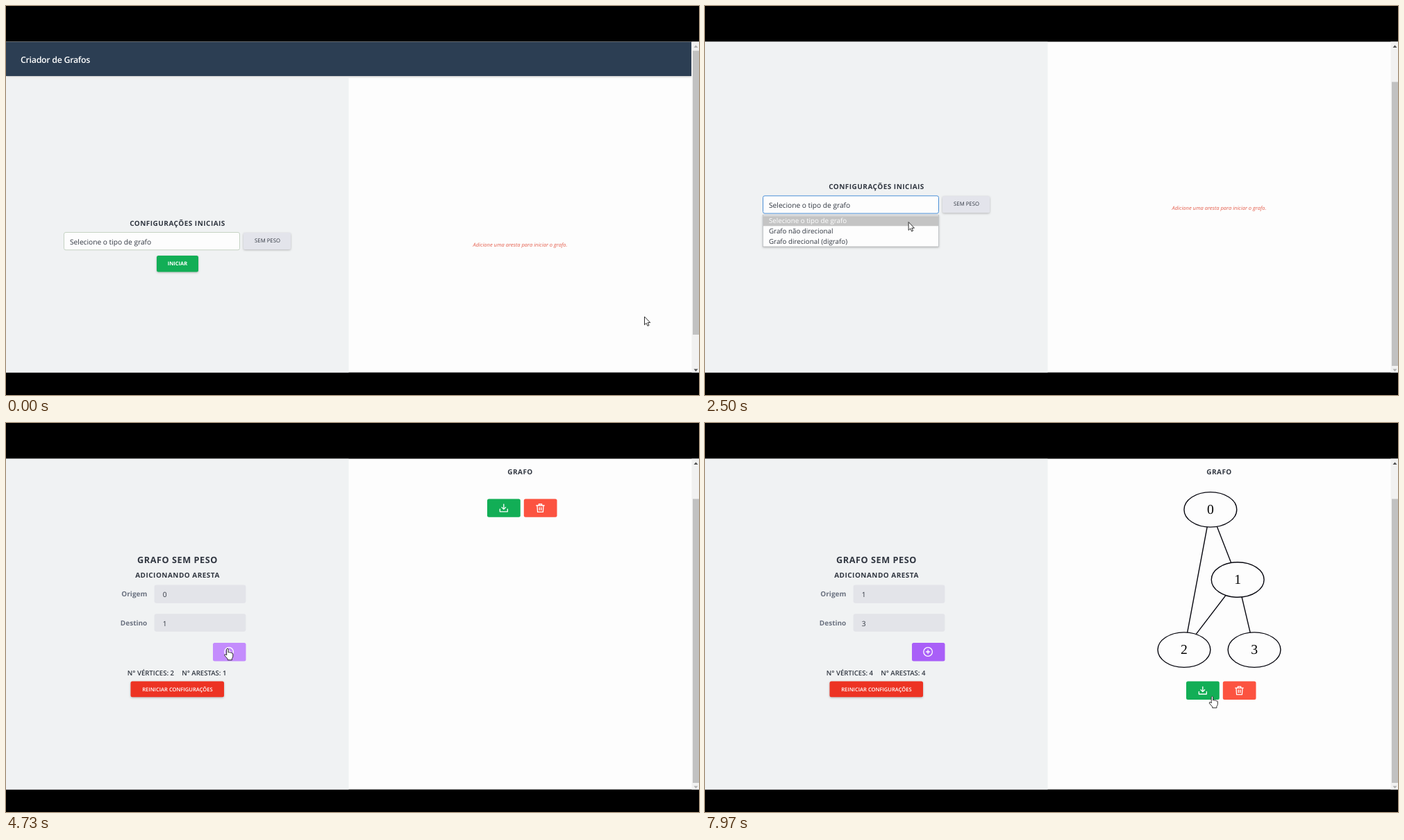
Write an HTML page that moves like this. It is 998 px wide and 561 px high and loops after 8000 ms.

```html
<!DOCTYPE html>
<html lang="pt">
<head>
<meta charset="utf-8">
<title>Criador de Grafos</title>
<style>
  html, body { margin: 0; width: 100%; height: 100%; overflow: hidden; background: #000; }
  svg { display: block; width: 998px; height: 561px; }
  text { font-family: "Open Sans", "Noto Sans", sans-serif; fill: #303640; text-rendering: geometricPrecision; }
  .mid { text-anchor: middle; }
  .bold { font-weight: 700; }
  .semi { font-weight: 600; }
  .caps { font-size: 10px; font-weight: 700; letter-spacing: .48px; text-anchor: middle; }
  .field { font-size: 10.2px; }
  .option { font-size: 9.75px; }
  .label { font-size: 10px; font-weight: 700; fill: #6b7280; text-anchor: end; }
  .count { font-size: 9.6px; font-weight: 600; }
  .on-dark { fill: #fff; }
  .icon { fill: none; stroke: #fff; stroke-width: 1.3; stroke-linecap: round; stroke-linejoin: round; }
  .shadow { filter: drop-shadow(0 1.5px 1.5px rgba(0, 0, 0, .25)); }
  #graph text { font-family: "Liberation Serif", "Noto Serif", serif; fill: #000; text-anchor: middle; }
  #graph line, #graph ellipse { stroke: #080810; fill: #fdfdfd; }
  #cursor path { fill: #fff; stroke: #222; stroke-width: .95; stroke-linejoin: round; }
</style>
</head>
<body>
<svg viewBox="0 0 998 561">
  <clipPath id="window"><rect y="51.5" width="998" height="477"/></clipPath>
  <rect width="998" height="561"/>
  <g clip-path="url(#window)">
    <rect y="51" width="998" height="479" fill="#fdfdfd"/>
    <g id="page">
      <rect y="104" width="493.5" height="600" fill="#f0f2f3"/>
      <rect y="51.5" width="987" height="49.5" fill="#2c3e53" class="shadow"/>
      <text x="21" y="81.5" class="semi on-dark" font-size="12.4" letter-spacing="-.3">Criador de Grafos</text>
      <text id="hint" x="740.5" y="346.8" class="mid" font-size="7.55" font-style="italic" style="fill:#e5604f">Adicione uma aresta para iniciar o grafo.</text>
      <g id="setup">
        <text x="247" y="317" class="caps">CONFIGURAÇÕES INICIAIS</text>
        <rect id="select" x="83.5" y="326.5" width="253" height="25.3" rx="2.5" fill="#fdfdfd" stroke="#c6d3c4"/>
        <text id="choice" x="92" y="343.6" class="field"></text>
        <g class="shadow"><rect x="342" y="327" width="68" height="24" rx="2" fill="#e3e4eb"/></g>
        <text x="376.5" y="341.2" class="mid" font-size="7.75">SEM PESO</text>
        <g class="shadow"><rect x="217" y="360" width="60" height="23.5" rx="2.5" fill="#12ae56"/></g>
        <text x="247" y="374.4" class="mid bold on-dark" font-size="7.5">INICIAR</text>
      </g>
    </g>
    <g id="menu">
      <rect x="83.5" y="301.5" width="253" height="45.5" fill="#fdfdfd" stroke="#b4b7bb" stroke-width=".7" class="shadow"/>
      <rect id="highlight" x="84" width="252" height="14.7" fill="#c4c4c4"/>
      <text x="92" y="313.4" class="option">Selecione o tipo de grafo</text>
      <text x="92" y="328" class="option">Grafo não direcional</text>
      <text x="92" y="342.6" class="option">Grafo direcional (digrafo)</text>
    </g>
    <g id="editor">
      <text x="247" y="202.2" class="mid bold" font-size="12.7" letter-spacing=".55">GRAFO SEM PESO</text>
      <text x="247" y="223.4" class="caps">ADICIONANDO ARESTA</text>
      <text x="203.3" y="250" class="label">Origem</text>
      <text x="203.3" y="292.4" class="label">Destino</text>
      <rect id="originBox" x="214.2" y="234.2" width="130.6" height="25" rx="2.4" stroke-width="1.3"/>
      <rect id="targetBox" x="214.2" y="276" width="130.6" height="24.2" rx="2.4" stroke-width="1.3"/>
      <text id="origin" x="225.8" y="250.8" class="field"></text>
      <text id="target" x="225.8" y="293" class="field"></text>
      <rect id="add" x="298" y="317" width="47.5" height="26.5" rx="2.5"/>
      <path class="icon" d="M314.8 330a6.3 6.3 0 1 0 12.6 0a6.3 6.3 0 1 0-12.6 0M318.6 330h5M321.1 327.5v5"/>
      <text id="vertices" x="174.8" y="363.6" class="count"></text>
      <text id="edges" x="253.2" y="363.6" class="count"></text>
      <g class="shadow"><rect x="179.5" y="372.5" width="134.5" height="22.8" rx="2.5" fill="#ed3323"/></g>
      <text x="247" y="386.9" class="mid semi on-dark" font-size="7.6">REINICIAR CONFIGURAÇÕES</text>
    </g>
    <g id="result">
      <text x="740.5" y="73.6" class="caps">GRAFO</text>
      <g id="graph"></g>
      <g id="tools">
        <rect x="693" y="-13.2" width="47.8" height="26.4" rx="2.5" fill="#12ae56"/>
        <rect x="745.8" y="-13.2" width="47.7" height="26.4" rx="2.5" fill="#fc5340"/>
        <path class="icon" d="M716.8-5.5v7M714 -1l2.8 2.8L719.6-1M711.3 1.5v3.7h11v-3.7"/>
        <path class="icon" d="M763.8-3.6h11.4M767.3-3.6v-2h4.4v2M765-3.6l.6 9.4h7.8l.6-9.4M768.2-.8v3.8M770.8-.8v3.8"/>
      </g>
    </g>
    <rect x="987.5" y="51" width="11" height="479" fill="#f1f1f1"/>
    <rect id="thumb" x="989" width="9" height="409.5"/>
    <path id="upArrow" d="M990.5 60l3-3.4l3 3.4z"/>
    <path id="downArrow" d="M990.5 523.5l3 3.4l3-3.4z"/>
    <g id="cursor">
      <path id="arrow" d="M0 0V11.8L2.7 9.3L4.5 13.4L6.5 12.5L4.7 8.6H8.3Z"/>
      <path id="hand" d="M-1.3 1.2Q0-.8 1.2 1.2V6Q2.4 4.8 3.5 6.2Q4.9 5.2 5.8 6.8Q7.4 6.2 7.8 8V11.5Q7.6 13.5 6.4 14.6V16.8H.2V15.2L-4.2 10.2Q-4.4 8.2-2.6 8.7L-1.3 10Z"/>
      <path id="beam" d="M-2-5.5H2M0-5.5V5.5M-2 5.5H2"/>
    </g>
  </g>
</svg>
<script>
const LOOP = 8000, SCROLL = 52.7;
const el = Object.fromEntries([...document.querySelectorAll('[id]')].map(e => [e.id, e]));
const set = (e, attrs) => { for (const k in attrs) e.setAttribute(k, attrs[k]); };
const show = (e, on) => { e.style.display = on ? '' : 'none'; };
const ease = p => p * p * (3 - 2 * p);
const clamp = p => Math.min(1, Math.max(0, p));

// time, x, y of the pointer tip
const path = [
  [0, 919.5, 448], [150, 920, 447], [650, 985, 330], [820, 1001, 260], [1720, 1001, 310],
  [2200, 290, 290], [2330, 290, 290], [2480, 294.5, 311], [2650, 262, 325], [2780, 258, 325],
  [3080, 249.5, 328], [3370, 249.5, 328], [3600, 262, 247], [4150, 262, 249], [4480, 319, 325],
  [5000, 319, 325], [5240, 240, 289], [5530, 240, 290], [5770, 338.5, 338], [5980, 338.5, 338],
  [6190, 240, 247], [6370, 240, 247], [6540, 324, 330], [6700, 324, 330], [6890, 240, 289],
  [7060, 240, 289], [7250, 326, 332], [7480, 326, 332], [7900, 730.5, 394], [8000, 730.5, 394]
];
const choices = [[0, 'Selecione o tipo de grafo'], [2750, 'Grafo não direcional']];
const origins = [[0, ''], [3800, '0'], [6270, ''], [6350, '1']];
const targets = [[0, ''], [4080, '1'], [5380, ''], [5480, '2'], [6950, ''], [7040, '3']];
const focus = [[0, ''], [3640, 'origin'], [3940, 'target'], [4580, ''], [5280, 'target'],
  [5800, ''], [6220, 'origin'], [6580, ''], [6910, 'target'], [7290, '']];
const counts = [[0, [0, 0]], [4640, [2, 1]], [5880, [3, 2]], [6630, [3, 3]], [7320, [4, 4]]];

// nodes: [offset from centre, rank] in points
const graphs = [
  [0, null],
  [4850, { nodes: [[0, 0], [0, 1]], edges: ['01'] }],
  [5970, { nodes: [[0, 0], [-36, 1], [36, 1]], edges: ['01', '02'] }],
  [6720, { nodes: [[18, 0], [-18, 1], [18, 2]], edges: ['01', '02', '12'] }],
  [7410, { nodes: [[-9, 0], [19, 1], [-36, 2], [36, 2]], edges: ['01', '02', '12', '13'] }]
];

const at = (steps, t) => steps.filter(s => s[0] <= t).pop()[1];

function pointer(t) {
  const i = path.findIndex(p => p[0] > t);
  const [a, x, y] = path[i - 1], [b, u, v] = path[i];
  const p = ease((t - a) / (b - a));
  return [x + (u - x) * p, y + (v - y) * p];
}

function drawGraph(g) {
  if (!g) return '';
  const scale = 264 / (72 * Math.max(...g.nodes.map(n => n[1])) + 44);
  const spots = g.nodes.map(([x, rank]) => [740.5 + x * scale, 94 + (22 + 72 * rank) * scale]);
  const lines = g.edges.map(([a, b]) => {
    const [x1, y1] = spots[a], [x2, y2] = spots[b];
    return `<line x1="${x1}" y1="${y1}" x2="${x2}" y2="${y2}"/>`;
  });
  const nodes = spots.map(([x, y], i) =>
    `<ellipse cx="${x}" cy="${y}" rx="${27 * scale}" ry="${18 * scale}"/>
     <text x="${x}" y="${y + 4.2 * scale}" font-size="${14 * scale}">${i}</text>`);
  return `<g stroke-width="${scale}">${lines.join('')}${nodes.join('')}</g>`;
}

function paintField(box, focused) {
  set(box, { fill: focused ? '#fdfdfd' : '#e3e4e9', stroke: focused ? '#a95ff8' : '#e3e4e9' });
}

let drawn;
function render(t) {
  const scroll = ease(clamp((t - 1180) / 470));
  const editing = t >= 3230, [vertices, edges] = at(counts, t);
  const [x, y] = pointer(t);
  const over = (l, top, w, h) => x >= l && x <= l + w && y >= top && y <= top + h;

  set(el.page, { transform: `translate(0 ${-SCROLL * scroll})` });
  set(el.thumb, {
    y: 64.5 + 45 * scroll,
    fill: t > 930 && t < 1720 ? '#787878' : t > 740 && t < 1780 ? '#a8a8a8' : '#c1c1c1'
  });
  set(el.upArrow, { fill: scroll > 0 ? '#505050' : '#b0b0b0' });
  set(el.downArrow, { fill: scroll < 1 ? '#505050' : '#b0b0b0' });

  show(el.setup, !editing);
  show(el.hint, !edges);
  set(el.select, { stroke: t > 2300 ? '#4b8fd6' : '#c6d3c4' });
  el.choice.textContent = at(choices, t);

  const row = y > 317.6 && t > 2500 ? 1 : 0;
  show(el.menu, t >= 2330 && t < 2750);
  set(el.highlight, { y: 302.6 + 14.7 * row });
  el.menu.querySelectorAll('text').forEach((e, i) => { e.style.fill = i === row ? '#fff' : ''; });

  show(el.editor, editing);
  const focused = at(focus, t);
  paintField(el.originBox, focused === 'origin');
  paintField(el.targetBox, focused === 'target');
  el.origin.textContent = at(origins, t);
  el.target.textContent = at(targets, t);
  el.vertices.textContent = `N° VÉRTICES: ${vertices}`;
  el.edges.textContent = `N° ARESTAS: ${edges}`;
  const overAdd = editing && over(298, 317, 47.5, 26.5);
  set(el.add, { fill: overAdd ? '#c48cfd' : '#a95ff8' });

  const graph = at(graphs, t);
  show(el.result, edges > 0);
  if (graph !== drawn) {
    el.graph.innerHTML = drawGraph(graph);
    drawn = graph;
  }
  set(el.tools, { transform: `translate(0 ${graph ? 385.8 : 122.6})` });

  const overStart = t > 2780 && t < 3370 && over(217, 307, 60, 24);
  const overSelect = t > 1800 && t < 2330 && over(83, 274, 253, 26);
  const overTool = graph && over(693, 372, 100, 27);
  const hand = overAdd || overStart || overTool;
  const beam = editing && (over(213, 233, 132, 27) || over(213, 275, 132, 26));
  set(el.cursor, { transform: `translate(${x} ${y})` });
  show(el.hand, hand);
  show(el.beam, beam);
  show(el.arrow, !hand && !beam || overSelect);
}

const start = performance.now();
function tick() {
  render((performance.now() - start) % LOOP);
  requestAnimationFrame(tick);
}
tick();
</script>
</body>
</html>
```
